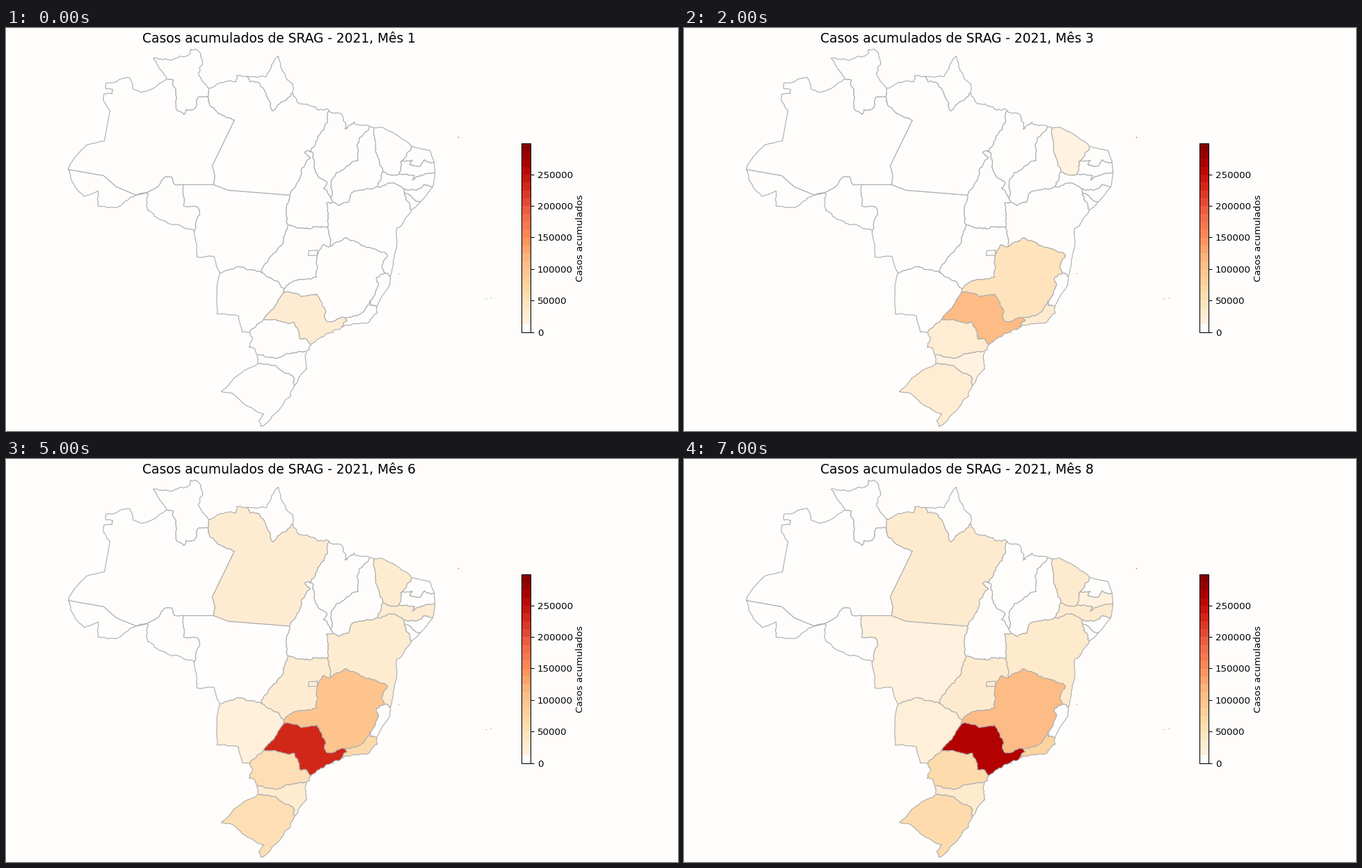
A matplotlib script for the animation above (8 s loop, 966 by 580 pixels).

```python
import numpy as np
import matplotlib.pyplot as plt
from matplotlib.animation import FuncAnimation
from matplotlib.collections import PolyCollection
from matplotlib.patches import Rectangle

W, H, DPI = 966, 580, 100
PT = 0.96  # one typographic point of the chart in figure points
MONTHS = 8
TOP, BANDS = 299.5, 24  # scale maximum in thousands, colour steps
BLANK, EDGE = "#fefdfc", "#b0b0b0"
CMAP = plt.get_cmap("OrRd")

rng = np.random.default_rng(7)
borders = []


def roughen(pts, k, rounds=4):
    """Fractal midpoint displacement along a polyline."""
    for _ in range(rounds):
        d = np.diff(pts, axis=0)
        size = np.hypot(d[:, 0], d[:, 1])[:, None]
        normal = np.c_[-d[:, 1], d[:, 0]] / size
        push = np.minimum(k * size, 1.8) * rng.uniform(-1, 1, size.shape)
        out = np.empty((2 * len(pts) - 1, 2))
        out[::2] = pts
        out[1::2] = pts[:-1] + d / 2 + normal * push
        pts = out
    return pts


def line(states, *xy, k=0.17):
    """Border shared by the named states, through a few key points."""
    pts = np.reshape(xy, (-1, 2)) + 0.5
    borders.append((states.split(), roughen(pts, k)))


def outline(state):
    """Chain all borders of a state into one ring."""
    parts = [p for owners, p in borders if state in owners]
    ring = parts.pop(0)
    while parts:
        options = parts + [p[::-1] for p in parts]
        gaps = [np.hypot(*(p[0] - ring[-1])) for p in options]
        i = int(np.argmin(gaps))
        ring = np.vstack([ring, options[i][1:]])
        parts.pop(i % len(parts))
    return ring


# North
line("RR", 231, 73, 218, 54, 211, 43, 240, 45, 264, 37, 265, 30, 273, 30,
     282, 48, 276, 66, 291, 86)
line("AM RR", 231, 73, 240, 74, 244, 92, 244, 115, 255, 124, 258, 117,
     270, 116, 276, 99, 290, 99)
line("RR PA", 290, 99, 291, 86, k=0)
line("AM", 231, 73, 207, 88, 195, 92, 182, 87, 177, 71, 143, 79, 143, 87,
     153, 88, 152, 94, 140, 95, 140, 105, 149, 118, k=0.1)
line("AM", 149, 118, 141, 162, k=0)
line("AM", 141, 162, 115, 168, 97, 188, 89, 203, k=0.1)
line("AM AC", 89, 203, 140, 212, 158, 228, 187, 240, k=0)
line("AC", 89, 203, 99, 229, 112, 242, 132, 234, 132, 256, 157, 258,
     187, 240, k=0.1)
line("AM RO", 187, 240, 203, 236, 221, 224, 228, 214, 238, 214, 242, 225,
     255, 225, k=0.1)
line("RO", 187, 240, 204, 238, 203, 262, 233, 281, 270, 292)
line("RO MT", 255, 225, 255, 256, 275, 257, 278, 268, 270, 292, k=0.1)
line("AM MT", 255, 225, 298, 225, k=0)
line("AM PA", 298, 225, 300, 212, 296, 198, k=0.05)
line("AM PA", 296, 198, 328, 132, k=0)
line("AM PA", 328, 132, 305, 123, 290, 105, 290, 99)
line("PA", 291, 86, 318, 76, 330, 77, 331, 68, 347, 69)
line("PA AP", 347, 69, 350, 77, 364, 79, 383, 119, 404, 101, 411, 93)
line("AP", 347, 69, 374, 69, 391, 40, 402, 72, 412, 80, 411, 93, k=0.12)
line("PA", 411, 93, 419, 106, 440, 112, 464, 118, k=0.3)
line("PA MA", 464, 118, 457, 146, 438, 176, 434, 176)
line("PA TO", 434, 176, 429, 178, 437, 187, 424, 203, 421, 218, 407, 240)
line("MT PA", 407, 240, 319, 233, 298, 225, k=0)
line("MT TO", 407, 240, 402, 269, 404, 281)

# Northeast
line("MA", 464, 118, 482, 124, 487, 145, 500, 135, 522, 142, k=0.4)
line("MA TO", 434, 176, 441, 180, 444, 207, 461, 222, 456, 230, 466, 244)
line("MA PI", 522, 142, 507, 158, 506, 190, 474, 208, 467, 220, 466, 244)
line("PI TO", 466, 244, 469, 250)
line("PI BA", 469, 250, 478, 255, 492, 250, 496, 237, 533, 228)
line("TO BA", 469, 250, 460, 252, 462, 285)
line("PI", 522, 142, 528, 143)
line("PI CE", 528, 143, 531, 178, 541, 206)
line("CE", 528, 143, 540, 142, 562, 154, 583, 170, k=0.06)
line("CE RN", 583, 170, 567, 192)
line("RN", 583, 170, 609, 176, 615, 193, k=0.06)
line("CE PB", 567, 192, 565, 210)
line("PB RN", 567, 192, 584, 190, 580, 196, 595, 198, 601, 189, 615, 193)
line("PB", 615, 193, 616, 207, k=0.05)
line("PE CE", 541, 206, 556, 211, 565, 210)
line("PE PB", 565, 210, 587, 212, 584, 219, 597, 211, 616, 207)
line("PE", 616, 207, 613, 228, k=0.05)
line("PI PE", 541, 206, 533, 228)
line("PE BA", 533, 228, 556, 222, 571, 231)
line("PE AL", 571, 231, 592, 231, 600, 225, 613, 228)
line("AL BA", 571, 231, 572, 236)
line("AL", 613, 228, 595, 250, k=0.05)
line("AL SE", 572, 236, 595, 250)
line("SE", 595, 250, 582, 262, k=0.05)
line("SE BA", 572, 236, 582, 262, k=0.3)
line("BA", 582, 262, 568, 284, 561, 288, 561, 315, 552, 358, k=0.08)

# Centre-west
line("MT", 270, 292, 274, 329, 299, 329, 307, 352, k=0.08)
line("MT MS", 307, 352, 338, 343, 368, 352)
line("MT GO", 368, 352, 367, 346, 395, 313, 404, 281)
line("GO TO", 404, 281, 428, 287, 462, 285, k=0.4)
line("GO BA", 462, 285, 466, 314)
line("GO MG", 466, 314, 456, 311, 447, 327, 446, 358, 412, 364, 399, 375)
line("GO MS", 399, 375, 368, 352)
line("MG MS", 399, 375, 398, 381)
line("MS", 307, 352, 303, 383, 303, 411, 334, 414, 339, 437, 350, 438,
     k=0.08)
line("DF", 435, 320, 447, 319, 447, 327, 434, 327, 435, 320, k=0.03)

# Southeast
line("MG BA", 466, 314, 488, 301, 517, 315, 548, 327, 540, 344, 544, 352)
line("MG ES", 544, 352, 533, 358, 535, 370, 523, 392)
line("ES BA", 544, 352, 552, 358)
line("ES", 552, 358, 551, 370, 533, 400, k=0.08)
line("ES RJ", 523, 392, 523, 399, 533, 400)
line("MG RJ", 523, 392, 514, 408, 486, 416)
line("RJ", 533, 400, 533, 410, 521, 423, 487, 427, 482, 430, k=0.14)
line("RJ SP", 486, 416, 490, 420, 482, 430)
line("SP MG", 398, 381, 403, 379, 424, 386, 446, 382, 458, 404, 457, 415,
     461, 422, 486, 416)
line("SP MS", 398, 381, 385, 402, 370, 419, k=0.08)
line("SP PR", 370, 419, 414, 423, 422, 447, 431, 447, 438, 455)
line("SP", 482, 430, 461, 439, 438, 455)

# South
line("PR MS", 370, 419, 350, 438)
line("PR", 350, 438, 354, 446, 349, 459, 357, 461, 361, 470)
line("PR", 438, 455, 431, 465, k=0.4)
line("PR SC", 431, 465, 408, 468, 391, 474, 361, 470)
line("SC", 361, 470, 362, 482)
line("SC", 431, 465, 432, 490, 414, 514)
line("SC RS", 362, 482, 385, 485, 414, 503, 414, 514)
line("RS", 362, 482, 337, 497, 309, 523, 324, 525, 344, 542, 370, 555,
     363, 564, 366, 573, 372, 570, 381, 559, 408, 530, 414, 514, k=0.1)

STATES = ("AC AL AM AP BA CE ES GO DF MA MG MS MT PA PB PE PI "
          "PR RJ RN RO RR RS SC SE SP TO").split()

# State: (final total in thousands, first month on the scale)
TOTALS = dict(SP=(262, 1), MG=(112, 2), PR=(62, 2), RS=(61, 3), RJ=(74, 3),
              SC=(33, 3), CE=(32, 3), PA=(31, 4), PE=(31, 4), BA=(33, 4),
              GO=(31, 4), DF=(30, 6), MS=(20, 6), MT=(15, 7), PB=(15, 8))


def cases(state, month):
    """Cumulative cases: every state follows the same eased wave."""
    total, first = TOTALS.get(state, (0, 1))
    wave = np.sin(np.pi / 2 * (month / MONTHS) ** 1.3)
    return total * wave if month >= first else 0


def shade(value):
    return CMAP(value / TOP) if value >= TOP / BANDS else BLANK


fig = plt.figure(figsize=(W / DPI, H / DPI), dpi=DPI, facecolor=BLANK)
ax = fig.add_axes([0, 0, 1, 1])
ax.set(xlim=(0, W), ylim=(H, 0))
ax.axis("off")

land = PolyCollection([outline(s) for s in STATES], edgecolors=EDGE,
                      linewidths=0.85)
ax.add_collection(land, autolim=False)

# Small islands
ax.plot([649.5], [156.5], "o", color="#808080", ms=1.2, mew=0)
ax.plot([564, 690, 697, 470], [353, 389, 388, 438], "o", color=EDGE, ms=1.2,
        mew=0)

# Colour scale
X0, X1, Y0, Y1 = 741, 754.4, 437.6, 165.6
step = (Y0 - Y1) / BANDS
for i in range(BANDS):
    ax.add_patch(Rectangle((X0, Y0 - (i + 1) * step), X1 - X0, step, lw=0,
                           fc=shade((i + 0.5) * TOP / BANDS),
                           antialiased=False))
ax.add_patch(Rectangle((X0, Y1), X1 - X0, Y0 - Y1, fill=False, ec="black",
                       lw=0.8 * PT))
for v in range(0, 300, 50):
    y = Y0 - v / TOP * (Y0 - Y1)
    ax.plot([X1, X1 + 4.7], [y, y], color="black", lw=0.8 * PT,
            solid_capstyle="butt")
    ax.text(X1 + 9.4, y, str(v * 1000), fontsize=10 * PT,
            va="center_baseline")
ax.text(825.5, 302, "Casos acumulados", fontsize=10 * PT, rotation=90,
        ha="center", va="center")

title = ax.text(392, 21.3, "", fontsize=14 * PT, ha="center", va="baseline")


def update(i):
    month = i + 1
    title.set_text(f"Casos acumulados de SRAG - 2021, Mês {month}")
    land.set_facecolor([shade(cases(s, month)) for s in STATES])
    return land, title


anim = FuncAnimation(fig, update, frames=MONTHS, interval=1000, repeat=True)
plt.show()
```
